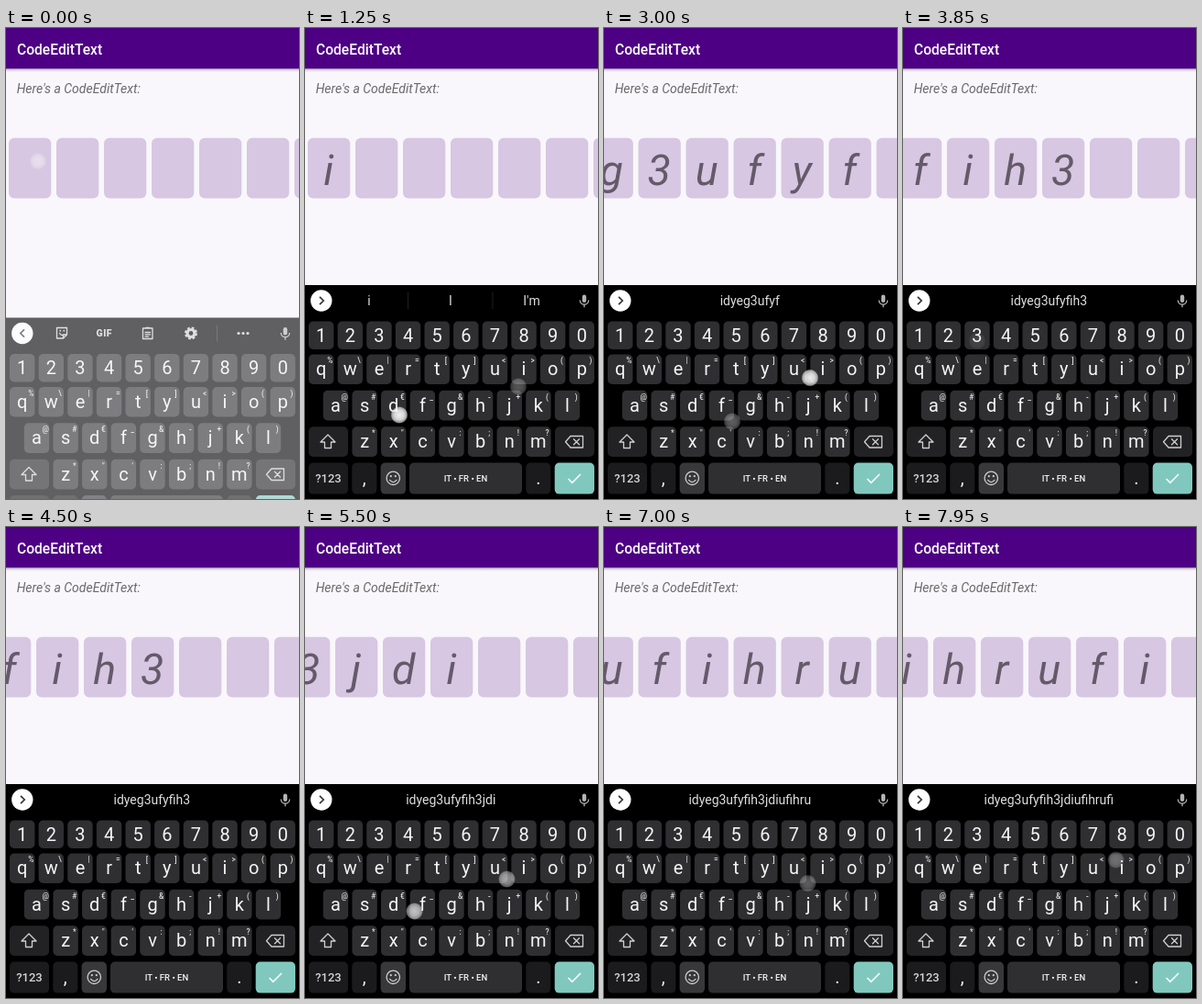
Recreate the animation shown at these times as an HTML page. Size 320 px wide and 513 px high, loop 8000 ms.

```html
<!DOCTYPE html>
<html lang="en">
<head>
<meta charset="utf-8">
<title>CodeEditText</title>
<style>
  html, body { margin: 0; width: 100%; height: 100%; overflow: hidden; background: #f9f7fb; }
  svg { display: block; width: 320px; height: 513px; font-family: Roboto, "Noto Sans", sans-serif; }
  .digit { font-style: italic; font-size: 46.6px; fill: #645a69; text-anchor: middle; }
  .key { font-size: 20px; fill: #f4f4f4; text-anchor: middle; }
  .hint { font-size: 8.3px; font-weight: 500; fill: #dededf; text-anchor: middle; }
  .word { font-size: 14px; fill: #dedee0; text-anchor: middle; }
  .line { fill: none; stroke: #cfcfd1; stroke-width: 1.3; stroke-linejoin: round; stroke-linecap: round; }
</style>
</head>
<body>
<svg viewBox="0 0 320 513">
  <defs>
    <linearGradient id="shade" x2="0" y2="1">
      <stop offset="0" stop-color="#000" stop-opacity=".24"/>
      <stop offset="1" stop-color="#000" stop-opacity="0"/>
    </linearGradient>
    <radialGradient id="glow">
      <stop offset="0" stop-color="#fff" stop-opacity=".92"/>
      <stop offset=".55" stop-color="#fff" stop-opacity=".8"/>
      <stop offset=".86" stop-color="#eee" stop-opacity=".62"/>
      <stop offset="1" stop-color="#ccc" stop-opacity="0"/>
    </radialGradient>
  </defs>
  <rect width="320" height="513" fill="#f9f7fb"/>
  <rect y="44" width="320" height="4" fill="url(#shade)"/>
  <rect width="320" height="44.3" fill="#4d0083"/>
  <text x="12" y="28.6" font-size="15.6" font-weight="500" fill="#fff">CodeEditText</text>
  <text x="11.7" y="71.4" font-size="14" font-style="italic" fill="#6a696c">Here's a CodeEditText:</text>
  <g id="cells"></g>
  <g id="board">
    <rect y="280" width="320" height="270" fill="#000"/>
    <circle cx="17.8" cy="297" r="11.7" fill="#fff"/>
    <path id="chevron" fill="none" stroke="#333" stroke-width="1.7"/>
    <g id="tools">
      <path class="line" d="M55.5 291h11v7.5l-4 4h-7zM66.5 298.5h-4v4M58.5 297q2 3 4.5 1.5"/>
      <path d="M58.5 293.5h1.6v1.6h-1.6zM62.5 293.5h1.6v1.6h-1.6z" fill="#cfcfd1"/>
      <text x="107.3" y="300.7" font-size="10.5" font-weight="900" letter-spacing=".5" text-anchor="middle" fill="#cfcfd1">GIF</text>
      <path class="line" d="M149.5 291.5h10.5v11.5h-10.5zM152 296h5.5M152 298.3h5.5M152 300.6h3.5M152.8 291h4"/>
      <circle cx="202" cy="297" r="4" fill="none" stroke="#cfcfd1" stroke-width="3.2"/>
      <circle cx="202" cy="297" r="6" fill="none" stroke="#cfcfd1" stroke-width="2" stroke-dasharray="2.7 2.012"/>
      <path d="M230.5 288v18" stroke="#777" stroke-opacity=".35"/>
      <g fill="#cfcfd1"><circle cx="254" cy="297" r="1.6"/><circle cx="259" cy="297" r="1.6"/><circle cx="264" cy="297" r="1.6"/></g>
    </g>
    <g id="three">
      <path d="M112.5 288v18M205 288v18" stroke="#1f1f21"/>
      <text class="word" x="70" y="302.4">i</text>
      <text class="word" x="159" y="302.4">I</text>
      <text class="word" x="247.5" y="302.4">I'm</text>
    </g>
    <text id="typed" class="word" x="159.3" y="302.4"></text>
    <rect x="302.8" y="290.5" width="4.4" height="8.5" rx="2.2" fill="#b4b4b6"/>
    <path d="M300.3 296.5a4.7 4.7 0 0 0 9.4 0M305 301.2v3" fill="none" stroke="#b4b4b6" stroke-width="1.3"/>
    <g id="keys"></g>
    <path class="line" d="M25 443l-8 8h4.5v6.5h7v-6.5h4.5z"/>
    <path class="line" d="M290 444.5h13.5v12.5h-13.5l-5.5-6.25zM293.5 447.7l6 6M299.5 447.7l-6 6"/>
    <circle class="line" cx="96.3" cy="490.3" r="7.2"/>
    <path class="line" d="M92.6 492.4q3.7 4.3 7.4 0"/>
    <circle cx="93.8" cy="488.2" r="1.1" fill="#cfcfd1"/><circle cx="98.8" cy="488.2" r="1.1" fill="#cfcfd1"/>
    <path d="M287.5 491l4.3 4.3 9.2-9.3" fill="none" stroke="#f4ffff" stroke-width="1.6"/>
  </g>
  <g id="touches"></g>
</svg>
<script>
const LOOP = 8000, STEP = 50, PITCH = 52, KEY_PITCH = 31.62;
const LIGHT = '#2f2f32', MID = '#222225', DARK = '#1b1b1e';
const $ = id => document.getElementById(id);

function add(parent, tag, attrs, text) {
  const el = document.createElementNS('http://www.w3.org/2000/svg', tag);
  for (const k in attrs) el.setAttribute(k, attrs[k]);
  if (text) el.textContent = text;
  parent.appendChild(el);
  return el;
}

// Keyboard rows, each centred: letters, hints, top, height, baseline
const rows = [
  ['1234567890', '', 319.5, 30.5, 341.8],
  ['qwertyuiop', '%\\|=[]<>()', 355.5, 32.5, 378],
  ['asdfghjkl', '@#€_&-+()', 394.8, 32.7, 417.7],
  ['zxcvbnm', '*"\':;!?', 434.2, 32.8, 457]
];
const keyAt = {};
const keys = $('keys');

function plate(x, y, w, h, fill) {
  add(keys, 'rect', { x, y, width: w, height: h, rx: 5, fill });
}

for (const [letters, hints, top, h, base] of rows) {
  [...letters].forEach((c, i) => {
    const x = 160 + KEY_PITCH * (i - (letters.length - 1) / 2);
    keyAt[c] = [x, top + h / 2];
    plate(x - 13.7, top, 27.4, h, LIGHT);
    add(keys, 'text', { class: 'key', x, y: base }, c);
    if (hints) add(keys, 'text', { class: 'hint', x: x + 9.7, y: base - 13 }, hints[i]);
  });
}
plate(4, 434.2, 43, 32.8, MID);
plate(273, 434.2, 43, 32.8, MID);
for (const [x, w, fill] of [[4, 43, DARK], [51.3, 27, DARK], [82.6, 27.4, '#38383b'],
                            [114, 123, LIGHT], [241.3, 27, DARK], [272.7, 43.3, '#80c8be']])
  plate(x, 473.6, w, 34, fill);
add(keys, 'text', { class: 'key', x: 25.5, y: 494.6, style: 'font-size:13px;font-weight:500;fill:#d4d4d6' }, '?123');
add(keys, 'text', { class: 'key', x: 64.8, y: 497 }, ',');
add(keys, 'text', { class: 'key', x: 254.8, y: 497 }, '.');
add(keys, 'text', { class: 'key', x: 175.5, y: 494, style: 'font-size:9.5px;font-weight:500' }, 'IT • FR • EN');

// Key presses: character, time it shows, optional touch point
const presses = [
  ['i', 1215, 233, 390.5], ['d', 1360, 103, 421.5], ['y', 1620], ['e', 1820],
  ['g', 2050], ['3', 2270], ['u', 2470], ['f', 2620], ['y', 2790],
  ['f', 2972, 140, 428.5], ['i', 3105, 225, 381], ['h', 3310], ['3', 3760],
  ['j', 4720], ['d', 4900], ['i', 5010], ['u', 5520, 220.5, 383.5],
  ['f', 5550, 119.5, 418.5], ['i', 5800], ['h', 6080], ['r', 6620],
  ['u', 6972, 222.5, 388], ['f', 7650], ['i', 7910, 232.5, 362.5]
];
const code = presses.map(p => p[0]).join('');

const cells = $('cells');
for (let i = 0; i < 27; i++)
  add(cells, 'rect', { x: 3 + PITCH * i, y: 119.8, width: 46.3, height: 65.8, rx: 6, fill: '#d7c7e2' });
const digits = [...code].map((c, i) =>
  add(cells, 'text', { class: 'digit', x: 25.7 + PITCH * i, y: 171 }, c));

const dots = [['', -20, 35, 145], ...presses].map(([c, at, x, y]) => {
  const [kx, ky] = keyAt[c] || [0, 0];
  const el = add($('touches'), 'circle', { cx: x || kx, cy: y || ky + 6, r: 9.5, fill: 'url(#glow)' });
  return { at, el };
});

const clamp = v => Math.max(0, Math.min(1, v));

function viscous(p) {
  const e = Math.exp(-1);
  const curve = v => v < 1 ? v - 1 + Math.exp(-v) : e + (1 - e) * (1 - Math.exp(1 - v));
  return curve(8 * p) / curve(8);
}

// Every third cell would be cut off, so it is brought to the centre
function scrollAt(t) {
  let pos = 0;
  for (let i = 6; i < presses.length; i += 3) {
    const p = clamp((t - presses[i][1]) / 250);
    pos += (PITCH * i - 134 - pos) * viscous(p);
    if (p < 1) break;
  }
  return pos;
}

function touchAlpha(t, at) {
  if (t < at - 170) return 0;
  return clamp(1 - (t - at + 100) / 215);
}

function show(el, on) { el.style.display = on ? '' : 'none'; }

function draw(t) {
  const count = presses.filter(p => p[1] <= t).length;
  const rest = (1 - clamp(t / 170)) ** 2;
  $('board').setAttribute('transform', `translate(0 ${35.5 * rest})`);
  $('board').setAttribute('opacity', 1 - 0.39 * rest);
  $('chevron').setAttribute('d', count ? 'M16 292.8l4.2 4.2-4.2 4.2' : 'M20 292.8l-4.2 4.2 4.2 4.2');
  show($('tools'), count === 0);
  show($('three'), count === 1);
  $('typed').textContent = count > 1 ? code.slice(0, count) : '';
  cells.setAttribute('transform', `translate(${-scrollAt(t)} 0)`);
  digits.forEach((el, i) => show(el, i < count));
  dots.forEach(({ at, el }) => el.setAttribute('opacity', touchAlpha(t, at)));
}

function tick() {
  const t = performance.now() % LOOP;
  draw(t - t % STEP);
  requestAnimationFrame(tick);
}
tick();
</script>
</body>
</html>
```
